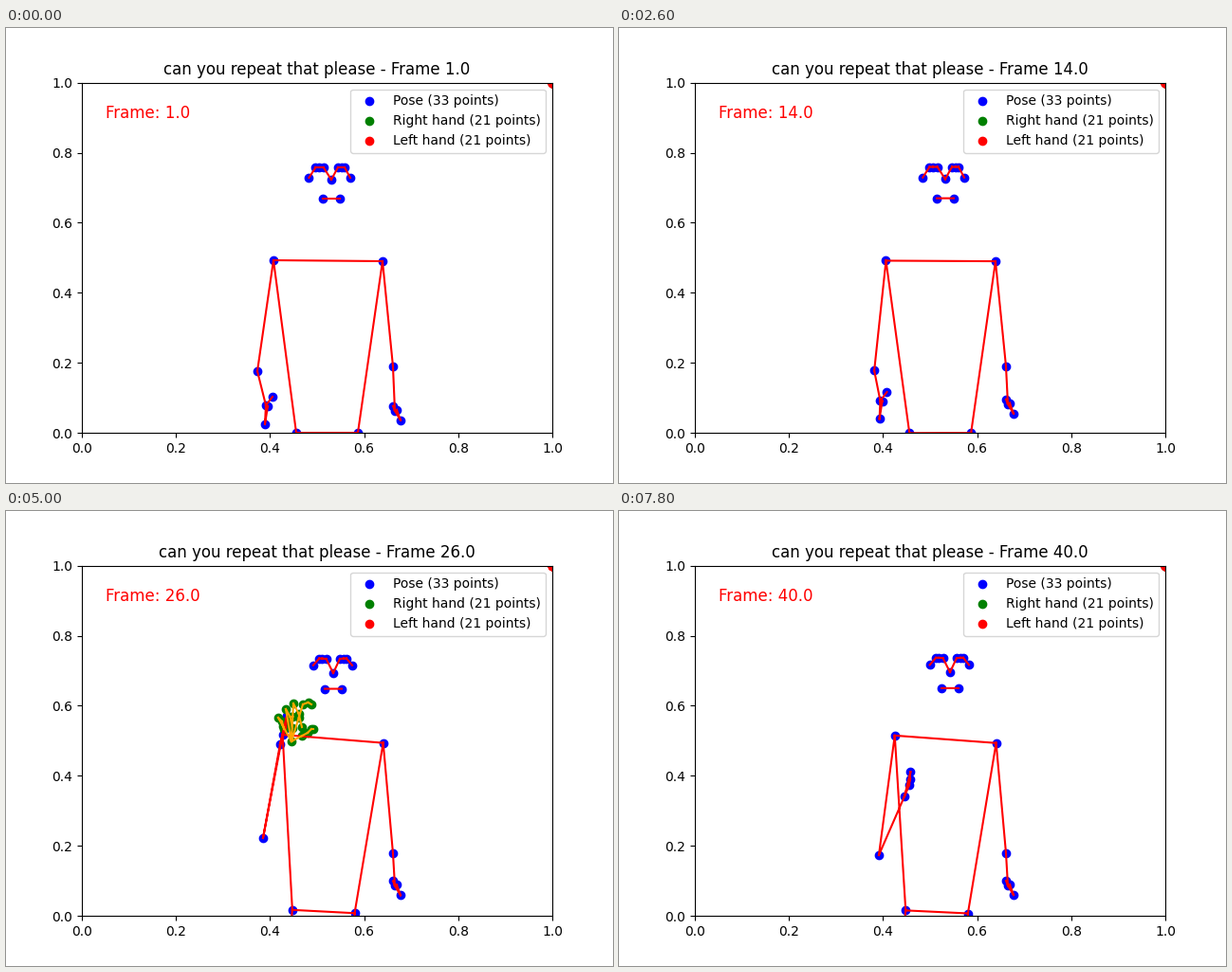
These frames come from a looping animation (640 by 480 pixels, 8000 ms). A matplotlib script:

```python
import numpy as np
import matplotlib.pyplot as plt
from matplotlib.animation import FuncAnimation

W, H = 640, 480
FRAMES, INTERVAL = 40, 200

# Key poses in stage pixels; everything else follows from these three paths.
KEYS = np.array([1, 9, 19, 26, 30, 36, 40])
NOSE = np.array([(343, 160), (343, 161), (345, 160), (345, 171),
                 (344, 176), (345, 173), (349, 170)], float)
ELBOW = np.array([(265, 362), (269, 359), (269, 361), (271, 345),
                  (272, 333), (274, 341), (274, 363)], float)
WRIST = np.array([(274, 398), (274, 396), (279, 366), (289, 246),
                  (287, 254), (295, 241), (301, 301)], float)

# Landmark order: nose, two eyes with ear (4 + 4), mouth (2), shoulders (2),
# hips (2), knees (2), then elbow, wrist, pinky, index, thumb of each arm.
POSE_EDGES = [(0, 1), (0, 5), (9, 10), (11, 12), (13, 14)]
POSE_EDGES += [(i, i + 1) for i in (1, 2, 3, 5, 6, 7)]
for side, elbow in ((0, 17), (1, 22)):
    shoulder, hip, knee, wrist = 11 + side, 13 + side, 15 + side, elbow + 1
    POSE_EDGES += [(shoulder, hip), (hip, knee), (shoulder, elbow),
                   (elbow, wrist), (wrist + 1, wrist + 2)]
    POSE_EDGES += [(wrist, wrist + k) for k in (1, 2, 3)]

# Pinky, index and thumb relative to the wrist.
HAND_DOWN = np.array([(-1, 20), (2, 1), (7, -9)])
HAND_UP = np.array([(6, -17), (7, -30), (6, -20)])
HAND_REST = np.array([(6, 10), (2, -1), (-2, -5)])

# Thumb to pinky: middle knuckle and fingertip relative to the palm base.
PALM = np.array([12, -3])
KNUCKLES = np.array([(17, -9), (12, -39), (2, -40), (-6, -34), (-14, -25)])
TIPS = np.array([(23, -13), (21, -39), (11, -15), (1, -14), (-8, -13)])
HAND_EDGES = [(0, b) for b in range(1, 21, 4)]
HAND_EDGES += [(i, i + 1) for b in range(1, 21, 4) for i in range(b, b + 3)]
CORNER = np.ones((21, 2))


def along(path, n):
    """Smooth curve through the key points of a path."""
    k = min(np.searchsorted(KEYS, n, side="right") - 1, len(KEYS) - 2)
    h = KEYS[k + 1] - KEYS[k]
    t = (n - KEYS[k]) / h
    slope = np.gradient(path, KEYS, axis=0)
    ease = t * t * (3 - 2 * t)
    return (path[k] * (1 - ease) + path[k + 1] * ease
            + h * t * (1 - t) * ((1 - t) * slope[k] - t * slope[k + 1]))


def mix(a, b, t):
    return np.add(a, np.subtract(b, a) * t)


def face(nose, lean):
    x = np.array([7, 11, 14, 20])
    y = mix([-13, -13, -13, -2], [-16, -16.5, -16.5, -11], lean)
    near = np.column_stack([-x * mix(1.18, 1, lean), y])
    far = np.column_stack([x, y])
    mouth = [(-9, 20 - 5 * lean), (9, 20 - 5 * lean)]
    return nose + np.vstack([(0, 0), near, far, mouth])


def torso(lean):
    shoulders = mix([(282, 245), (397, 246)], [(296, 232), (398, 244)], lean)
    hips = mix([(306, 427), (371, 427)], [(300, 418), (366, 423)], lean)
    knees = hips + [(-12, 130), (0, 130)]
    return np.vstack([shoulders, hips, knees])


def right_arm(n):
    wrist = along(WRIST, n)
    lift = np.clip((396 - wrist[1]) / 110, 0, 1)
    return np.vstack([along(ELBOW, n), wrist,
                      wrist + mix(HAND_DOWN, HAND_UP, lift)])


def left_arm(n, lean):
    wrist = np.array([410, 395 + 10 * np.exp(-n / 8)])
    return np.vstack([(408, 357 + 6 * lean), wrist, wrist + HAND_REST])


def open_hand(wrist):
    base = wrist + PALM
    bent = (KNUCKLES + TIPS) / 2 + [1, -2]
    joints = np.stack([KNUCKLES * 0.65, KNUCKLES, bent, TIPS], axis=1)
    return np.vstack([base, base + joints.reshape(-1, 2)])


def hand_seen(n):
    return 24 <= n <= 28 or 32 <= n <= 34


def to_data(px):
    return (px - [80, 427.2]) / [496, -369.6]


def set_edges(line, pts, edges):
    gap = [np.nan, np.nan]
    path = np.array([p for i, j in edges for p in (pts[i], pts[j], gap)])
    line.set_data(path[:, 0], path[:, 1])


fig, ax = plt.subplots(figsize=(W / 100, H / 100), dpi=100)
ax.set_xlim(0, 1)
ax.set_ylim(0, 1)
pose_dots = ax.scatter([], [], c="blue", label="Pose (33 points)")
right_dots = ax.scatter([], [], c="green", label="Right hand (21 points)")
left_dots = ax.scatter(*CORNER.T, c="red", label="Left hand (21 points)")
pose_line, = ax.plot([], [], color="red")
hand_line, = ax.plot([], [], color="orange")
counter = ax.text(0.05, 0.9, "", fontsize=12, color="red")
title = ax.set_title("")
ax.legend(loc="upper right")


def update(i):
    n = i + 1
    nose = along(NOSE, n)
    lean = (nose[1] - 160) / 16
    arm = right_arm(n)
    pts = to_data(np.vstack([face(nose, lean), torso(lean),
                             arm, left_arm(n, lean)]))
    pose_dots.set_offsets(pts)
    set_edges(pose_line, pts, POSE_EDGES)
    if hand_seen(n):
        hand = to_data(open_hand(arm[1]))
        right_dots.set_offsets(hand)
        set_edges(hand_line, hand, HAND_EDGES)
    else:
        right_dots.set_offsets(CORNER)
        hand_line.set_data([], [])
    counter.set_text(f"Frame: {n:.1f}")
    title.set_text(f"can you repeat that please - Frame {n:.1f}")
    return pose_dots, right_dots, pose_line, hand_line, counter, title


anim = FuncAnimation(fig, update, frames=FRAMES, interval=INTERVAL,
                     repeat=True, repeat_delay=0, blit=False)
plt.show()
```
